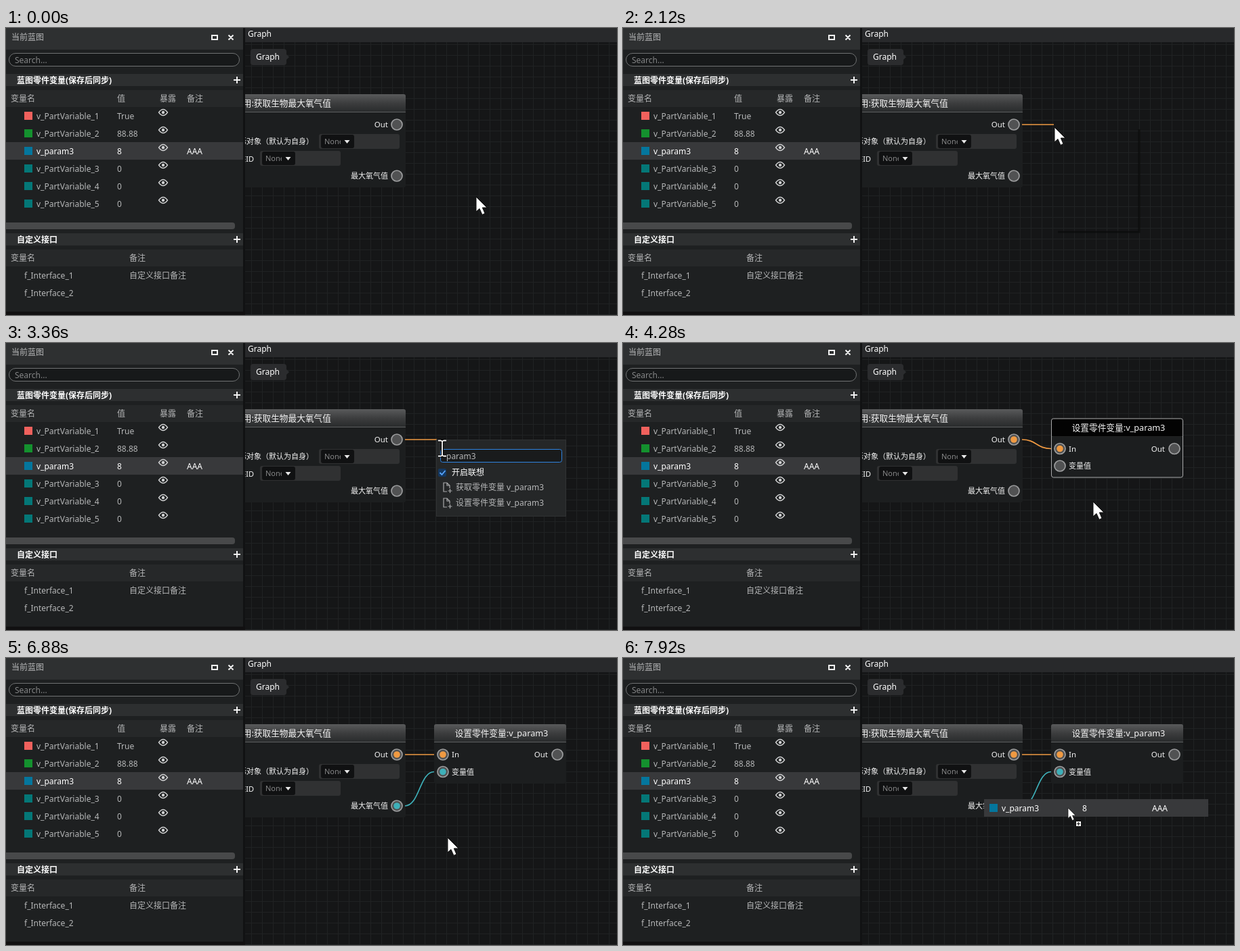
These frames come from a looping animation (902 px wide and 425 px high, 8 s). An HTML page:

```html
<!DOCTYPE html>
<html lang="zh">
<head>
<meta charset="utf-8">
<style>
  html, body { margin: 0; width: 100%; height: 100%; overflow: hidden; background: #161718; }
  svg { display: block; width: 902px; height: 425px; }
  text { font: 12px "Noto Sans", "Noto Sans CJK SC", "Noto Sans CJK", sans-serif; fill: #b6b7b8; white-space: pre; }
  .w { fill: #fff; }
  .b { fill: #fff; font-weight: 700; }
  .s { fill: #f2f2f2; font-size: 11px; }
  .io { fill: #f2f2f2; font-size: 11.5px; }
  .title { fill: #f4f4f4; font-size: 12.7px; }
  .end { text-anchor: end; }
  .mid { text-anchor: middle; }
  .dim { fill: #858687; }
</style>
</head>
<body>
<svg id="stage" viewBox="0 0 902 425" xmlns="http://www.w3.org/2000/svg"></svg>
<script>
const LOOP = 8000;
const ORANGE = '#f09a42', TEAL = '#3eb0b9';
const $ = id => document.getElementById(id);

const rect = (x, y, w, h, fill, extra = '') =>
  `<rect x="${x}" y="${y}" width="${w}" height="${h}" fill="${fill}" ${extra}/>`;
const text = (x, y, str, cls = '') => `<text x="${x}" y="${y}" class="${cls}">${str}</text>`;
const plus = (x, y) => `<path d="M${x - 5} ${y}h10M${x} ${y - 5}v10" stroke="#f0f0f0" stroke-width="2"/>`;
const pin = (x, y, id, color) =>
  `<circle cx="${x}" cy="${y}" r="8" fill="#515253" stroke="#9c9d9e" stroke-width="1.7"/>
   <g id="${id}"><circle cx="${x}" cy="${y}" r="4.8" fill="${color}"/></g>`;
const eye = y =>
  `<path d="M225.5 ${y}Q232 ${y - 9} 238.5 ${y}Q232 ${y + 9} 225.5 ${y}Z" fill="none" stroke="#d0d1d2" stroke-width="1.3"/>
   <circle cx="232" cy="${y}" r="2.2" fill="#d0d1d2"/>`;

function variableRow([name, value, color, note], i) {
  const y = 117 + 26 * i, cls = note ? 'w' : '';
  return (note ? rect(0, y, 350, 26, '#38393b') : '') +
    rect(27, y + 7, 12, 12, color) + text(45, y + 18, name, cls) +
    text(164, y + 18, value, cls) + eye(y + 8) + (note ? text(267, y + 18, note, cls) : '');
}

function panel() {
  const rows = [
    ['v_PartVariable_1', 'True', '#f0615d'],
    ['v_PartVariable_2', '88.88', '#14912e'],
    ['v_param3', '8', '#04769d', 'AAA'],
    ...[3, 4, 5].map(n => ['v_PartVariable_' + n, '0', '#047777'])
  ];
  return rect(0, 0, 353, 425, '#111213') + rect(0, 0, 350, 420, '#1e2021') +
    rect(0, 0, 350, 32, '#2e3031') + text(8, 18, '当前蓝图') +
    `<path d="M304 11h8v6h-8zM328.500 10.500l7 7m0-7l-7 7" fill="none" stroke="#f2f2f2" stroke-width="2"/>` +
    rect(4.5, 37.5, 340, 19, '#17191a', 'rx="9.500" stroke="#707273"') + text(13, 52, 'Search...', 'dim') +
    rect(0, 68, 350, 18, '#2d2f30') + text(16, 82, '蓝图零件变量(保存后同步)', 'b') + plus(341, 77) +
    rect(0, 92, 350, 25, '#262829') + text(7, 109, '变量名') + text(164, 109, '值') +
    text(227, 109, '暴露') + text(267, 109, '备注') +
    rows.map(variableRow).join('') +
    rect(-5, 288, 343, 10, '#48494a', 'rx="4"') +
    rect(0, 304, 350, 18, '#2d2f30') + text(16, 318, '自定义接口', 'b') + plus(341, 313) +
    rect(0, 328, 350, 25, '#262829') + text(7, 345, '变量名') + text(182, 345, '备注') +
    text(27, 371, 'f_Interface_1') + text(182, 371, '自定义接口备注') + text(27, 397, 'f_Interface_2');
}

function combo(x, y, inset) {
  const bx = x + inset, cx = bx + 38.5;
  return rect(x, y, 119, 22, '#303132', 'rx="3"') + rect(bx, y + 1, 49, 20, '#101112', 'rx="3"') +
    `<svg x="${bx + 5}" y="${y}" width="24" height="22">${text(0, 15, 'None', 's dim')}</svg>
     <path d="M${cx - 4} ${y + 9}h8l-4 5z" fill="#e8e8e8"/>`;
}

const nodeBox = (id, x, w, h) =>
  rect(x, 98, w, h, '#1c1e1f', 'rx="3"') +
  rect(x, 98, w, 27, 'url(#head)', 'rx="3"') + rect(x, 124, w, 1, '#5e6061') +
  `<g id="${id}">${rect(x, 98, w, 27, '#030303', 'rx="3"')}
   ${rect(x + .5, 98.5, w - 1, h - 1, 'none', 'rx="3" stroke="#a8a9aa"')}</g>`;

const sourceNode = () => nodeBox('pickA', 300, 290, 138) +
  text(480, 116, '调用:获取生物最大氧气值', 'title end') +
  text(564, 147, 'Out', 'io end') + pin(577, 143, 'dotOut', ORANGE) +
  text(454, 172, '目标对象（默认为自身）', 's end') + combo(462, 157, 3) +
  text(366, 198, '状态ID', 's end') + combo(375, 182, 3) +
  text(564, 223, '最大氧气值', 's end') + pin(577, 219, 'dotValue', TEAL);

const setterNode = () => nodeBox('pickB', 632, 195, 88) +
  text(731.5, 116, '设置零件变量:v_param3', 'title mid') +
  pin(645, 143, 'dotIn', ORANGE) + text(658, 147, 'In', 'io') +
  pin(814, 143, 'dotNext', ORANGE) + text(800, 147, 'Out', 'io end') +
  pin(645, 168.5, 'dotSet', TEAL) + text(658, 172.5, '变量值', 's');

const menuItem = (y, label) =>
  `<path d="M655 ${y - 3}v-4l-4-4h-5v13h5M651 ${y - 11}v4h4M655.500 ${y - 2}v6m-3-3h6" fill="none" stroke="#a9aaab" stroke-width="1.2"/>` +
  text(664, y, label);

const menu = () => `<g id="menu">
  <rect id="menuBox" x="635.5" y="143.5" fill="#252728" stroke="#303233"/>
  <rect id="menuField" x="641.5" y="157.5" height="19" rx="3" fill="#191b1c" stroke="#2f83e0"/>
  ${rect(638, 186, 12, 12, '#14375f', 'rx="2"')}
  <path d="M640.500 192l3 3 5-6" fill="none" stroke="#58a6ff" stroke-width="1.8"/>
  ${text(658, 196, '开启联想', 'w')}
  <g id="items">${menuItem(218, '获取零件变量 v_param3')}${menuItem(241, '设置零件变量 v_param3')}
  ${text(650, 172, 'param3')}</g>
  <g id="caret">${rect(695, 159, 1, 17, '#e8e8e8')}</g></g>`;

const ARROW = 'M0 0V22L5 17.500L9 26.500L13 24.500L9.300 16H16Z';
const cursors = () => `<g id="cursor">
  <path id="arrow" d="${ARROW}" fill="#fff" stroke="#111" stroke-width="1"/>
  <path id="hand" d="M-4 11.500L-8 4Q-9.500 0-7 0L-5 2V-8Q-3.500-10-2-8V-10Q-.500-12.500 1.500-10V-8Q3.500-10 5-8V-5Q7-7 8-4.500V4L6 8V11.500Z
    M-2-8V-1M1.500-8V-1M5-5V-1" fill="#fff" stroke="#222" stroke-width=".9"/>
  <g id="beam"><path d="M-6-11.500H-2Q0-11 0-9.500Q0-11 2-11.500H6M0-10V10M-6 11.500H-2Q0 11 0 9.500Q0 11 2 11.500H6" fill="none" stroke="#000" stroke-width="4"/>
    <path d="M-6-11.500H-2Q0-11 0-9.500Q0-11 2-11.500H6M0-10V10M-6 11.500H-2Q0 11 0 9.500Q0 11 2 11.500H6" fill="none" stroke="#fff" stroke-width="1.8"/></g>
  <g id="drop"><path d="${ARROW}" transform="scale(.7)" fill="#fff" stroke="#111"/>
    ${rect(11.5, 19.5, 8, 8, '#fff', 'stroke="#111"')}<path d="M13 23.500h5m-2.500-2.500v5" stroke="#111"/></g></g>`;

$('stage').innerHTML = `<defs>
  <linearGradient id="head" x2="0" y2="1"><stop stop-color="#595a5b"/><stop offset=".5" stop-color="#3c3d3e"/><stop offset="1" stop-color="#282a2b"/></linearGradient>
  <pattern id="grid" width="16" height="16" x="362" y="24" patternUnits="userSpaceOnUse"><path d="M.5 0V16M0 .5H16" stroke="#202223"/></pattern>
  <clipPath id="graph"><rect x="353" width="549" height="425"/></clipPath></defs>
  ${rect(0, 0, 902, 425, '#151617')}${rect(353, 21, 549, 404, 'url(#grid)')}
  ${rect(353, 0, 549, 21, '#28292b')}${text(357, 13, 'Graph', 'w')}
  ${rect(361, 31, 53, 24, '#2b2c2e', 'rx="4"')}<path d="M414 39l4 4-4 4z" fill="#2b2c2e"/>${text(369, 47, 'Graph', 'w')}
  <g clip-path="url(#graph)">${sourceNode()}<g id="setter">${setterNode()}</g>
  <g fill="none" stroke-width="1.7"><path id="flow" stroke="${ORANGE}"/><path id="data" stroke="${TEAL}"/></g></g>
  <path id="shadow" d="M762 150V302H642" fill="none" stroke="#090a0b" stroke-width="3" opacity=".7"/>
  ${menu()}${panel()}${rect(0, 420, 353, 5, '#111011')}
  <g id="ghost">${rect(0, 0, 331, 26, '#38393b')}${rect(8, 7, 12, 12, '#04769d')}
  ${text(26, 18, 'v_param3', 'w')}${text(145, 18, '8', 'w')}${text(248, 18, 'AAA', 'w')}</g>
  ${cursors()}`;

// time, x, y of the pointer
const PATH = [
  [0, 694, 250], [120, 694, 250], [440, 574, 138], [680, 574, 138], [720, 577, 141], [1240, 635, 143], [1400, 635, 143],
  [1440, 636, 145], [1600, 636, 145], [1720, 637, 147], [3320, 637, 147], [3360, 644, 156], [3440, 644, 156],
  [3840, 694, 235], [4280, 694, 235], [4560, 582, 221], [4680, 582, 221], [4960, 645, 183], [5160, 645, 183],
  [5360, 735, 137], [5560, 735, 137], [5680, 540, 112], [5960, 540, 112], [6080, 652, 266], [6880, 652, 266],
  [7200, 143, 182], [7300, 143, 182], [7640, 507, 246], [7700, 507, 246], [7900, 657, 222], [8000, 657, 222]
];
const SHAPES = [[0, 'arrow'], [440, 'hand'], [1400, 'arrow'], [3340, 'beam'], [3520, 'arrow'],
  [4520, 'hand'], [5160, 'arrow'], [7320, 'drop']];

function pointerAt(t) {
  const i = PATH.findIndex(p => p[0] > t), a = PATH[i - 1], b = PATH[i];
  const u = (t - a[0]) / (b[0] - a[0]), e = u * u * (3 - 2 * u);
  return [a[1] + (b[1] - a[1]) * e, a[2] + (b[2] - a[2]) * e];
}

const show = (id, on) => $(id).setAttribute('display', on ? 'inline' : 'none');
const put = (id, x, y) => $(id).setAttribute('transform', `translate(${x} ${y})`);
const within = (t, a, b) => t >= a && t < b;

function wire(id, on, y0, x1, y1) {
  show(id, on);
  const m = (589 + x1) / 2;
  $(id).setAttribute('d', `M589 ${y0}C${m} ${y0} ${m} ${y1} ${x1} ${y1}`);
}

function drawMenu(t) {
  const narrow = t < 2080, full = t < 2280;
  const w = narrow ? 121 : t < 2720 ? 267 : 191;
  const h = full ? 290 : t < 2720 ? 136 : 113;
  show('menu', within(t, 1400, 2080) || within(t, 2160, 3960));
  show('shadow', within(t, 2080, 2160));
  $('menuBox').setAttribute('width', w);
  $('menuBox').setAttribute('height', h);
  $('menuField').setAttribute('width', w - 12);
  show('items', t >= 2280);
  show('caret', within(t, 2720, 3160));
}

function draw(t) {
  const [x, y] = pointerAt(t);
  const placed = t >= 3960, linked = t >= 4960, cleared = t >= 6040;
  const lift = 13.5 * (t < 5760 ? 1 : 0);

  show('setter', placed);
  put('setter', 0, lift);
  show('pickB', placed && !cleared);
  show('pickA', within(t, 5680, 6040));
  show('dotOut', within(t, 680, 1400) || placed);
  show('dotValue', t >= 4640);
  show('dotSet', linked);
  show('dotNext', false);

  if (placed) wire('flow', true, 143, 632, 143 + lift);
  else wire('flow', t >= 720, 143, t < 1400 ? Math.max(x, 589) : 636, t < 1400 ? y : 143);
  if (linked) wire('data', true, 219, 632, 168.5 + lift);
  else wire('data', t >= 4680, 219, Math.max(x, 589), y);

  drawMenu(t);
  show('ghost', t >= 7320);
  put('ghost', x - 124, y - 13);

  const shape = SHAPES.filter(s => s[0] <= t).pop()[1];
  for (const id of ['arrow', 'hand', 'beam', 'drop']) show(id, id === shape);
  put('cursor', x, y);
}

const start = performance.now();
function tick() {
  draw((performance.now() - start) % LOOP);
  requestAnimationFrame(tick);
}
tick();
</script>
</body>
</html>
```
